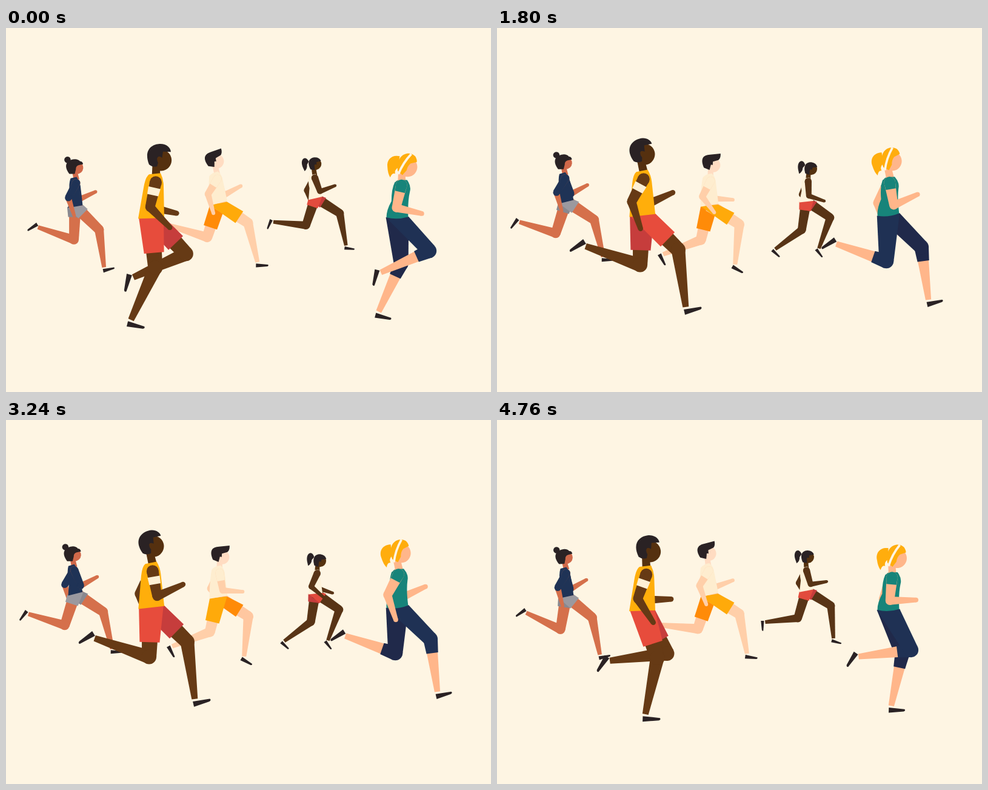
These frames come from a looping animation (800 by 600 pixels, 4800 ms). An HTML page:

```html
<!DOCTYPE html>
<html lang="en">
<head>
<meta charset="utf-8">
<title>Runners</title>
<style>
html, body { margin: 0; width: 100%; height: 100%; overflow: hidden; background: #fef5e3; }
svg { display: block; width: 100vw; height: 100vh; }
</style>
</head>
<body>
<svg id="stage" viewBox="0 0 800 600"></svg>
<script>
const STEP = 40, CYCLE = 24;
const INK = '#2a2224', CREAM = '#fef5e3';
const THIGH = 84, SHIN = 97, UPPER = 42, FORE = 47;

const mod = (n, m) => (n % m + m) % m;
const rad = a => a * Math.PI / 180;
const wave = (k, peak, period) => Math.cos(2 * Math.PI * (k - peak) / period);

// Smooth periodic curve through a few [step, value] keys.
function curve(...keys) {
  const n = keys.length;
  const key = i => [keys[mod(i, n)][0] + Math.floor(i / n) * CYCLE, keys[mod(i, n)][1]];
  const slope = i => {
    const [t0, v0] = key(i - 1), [t1, v1] = key(i + 1);
    return (v1 - v0) / (t1 - t0);
  };
  return k => {
    let i = 0;
    while (key(i + 1)[0] <= k) i++;
    const [t0, v0] = key(i), [t1, v1] = key(i + 1);
    const h = t1 - t0, u = (k - t0) / h, w = 1 - u;
    return v0 * w * w * (1 + 2 * u) + v1 * u * u * (3 - 2 * u) +
      h * u * w * (slope(i) * w - slope(i + 1) * u);
  };
}

// Limb angles through one stride, in degrees from straight down, forward positive.
const gait = {
  thigh: curve([0, 5], [5, -18.5], [9, -2], [12, 43.5], [15.5, 58], [21, 45.5]),
  shin: curve([0, -25], [4, -83], [7, -115], [9, -109], [12, -66], [14, -20], [17, 11], [21, 7.5]),
  foot: curve([0, 8], [3, 57], [5, 108], [9, 142], [12, 99], [15, 25], [18, -5], [21, -19]),
  upper: k => -9 + 27 * wave(k, 6, CYCLE) + 4 * wave(k, 6, CYCLE / 2),
  fore: k => 64 + 54 * wave(k, 7.2, CYCLE) + 4 * wave(k, 7.2, CYCLE / 2)
};
// Body motion repeats with every footfall, twice per stride.
const body = {
  bob: k => -9 + 9 * wave(k, -0.8, CYCLE / 2),
  lean: k => 4.9 + 4.9 * wave(k, 6.1, CYCLE / 2),
  nod: k => 10 + 10 * wave(k, 7.5, CYCLE / 2)
};

const runners = [
  { x: 114, y: 297, s: 0.66, phase: 21, skin: '#d5704b', face: '#d0694a',
    shirt: '#1f3356', near: '#9b999f', far: '#89888f', hem: 0.33, sleeve: 1,
    torso: 'M-18 3L-10 -32Q-12 -55 -5 -70L10 -72Q19 -58 18 -40L19 0Z',
    head: [10, -23, 15.5],
    hair: 'M-13 -14C-22 -40 -8 -47 6 -46Q18 -45 22 -36Q28 -34 27 -27L16 -28Q8 -28 6 -20L0 -10Z',
    bun: [-7, -49, 8] },
  { x: 350, y: 301, s: 0.7, phase: 18, skin: '#ffcfa9', farSkin: '#ffc7a0', face: '#ffdcc2',
    shirt: '#feedcf', near: '#ffaa0a', far: '#ff8b08', hem: 0.71, sleeve: 0.45,
    torso: 'M-21 2Q-17 -40 -10 -66Q-2 -74 12 -74Q20 -66 20 -52L22 -2Z',
    head: [8, -27, 17],
    hair: 'M-14 -22C-22 -44 -14 -52 2 -52L27 -53Q27 -42 21 -38L8 -35L7 -27Q2 -30 2 -25L-1 -16Z' },
  { x: 510, y: 290, s: 0.57, phase: 5, skin: '#583416', face: '#55320f',
    shirt: '#fef2da', near: '#e24b3d', far: '#c63d3c', hem: 0.32, sleeve: 0,
    torso: 'M-20 3L-12 -30Q-14 -55 -6 -66L12 -68Q16 -50 18 -36L21 0Z',
    head: [9, -27, 17.5],
    hair: 'M-8 -14C-16 -42 0 -47 10 -46Q24 -44 27 -32L13 -31L12 -24Q6 -28 5 -22L4 -10Z',
    tail: 'M-8 -38C-13 -56 -27 -52 -29 -36C-30 -26 -26 -18 -26 -13Q-16 -18 -15 -30Z' },
  { x: 239, y: 312, s: 1, phase: 0, skin: '#663a15', face: '#55300f',
    shirt: '#ffae0b', near: '#e74c3c', far: '#c63d3c', hem: 0.71, sleeve: 0, band: true,
    torso: 'M-21 3L-12 -48Q-9 -66 -3 -70L16 -72Q21 -62 21 -50L22 2Z',
    head: [10, -26, 17.5],
    hair: 'M-10 -20C-18 -44 -4 -53 9 -53C20 -53 27 -46 27 -39L14 -40L12 -30Q6 -35 4 -30Q3 -26 5 -22L3 -16Q-5 -15 -10 -20Z' },
  { x: 645, y: 312, s: 0.92, phase: 12, skin: '#ffb68a', face: '#ffb68a',
    shirt: '#17847a', near: '#1f3154', far: '#20294a', pants: true, sleeve: 0.3,
    torso: 'M-19 1Q-19 -12 -10 -28Q-10 -50 -4 -62Q6 -67 18 -66Q26 -55 23 -45Q19 -28 20 0Q0 6 -19 1Z',
    head: [12, -22, 17.5],
    hair: 'M-6 -16C-8 -48 18 -52 27 -40Q30 -34 29 -30L18 -28Q12 -24 10 -16L2 -8Z',
    tail: 'M-1 -42C-14 -46 -25 -38 -24 -24Q-24 -12 -20 -5Q-16 -14 -11 -11Q-12 -18 -5 -22Z',
    hairColor: '#ffad0d', headband: true }
];

const reach = (p, len, a) => [p[0] + len * Math.sin(rad(a)), p[1] + len * Math.cos(rad(a))];
const mix = (p, q, f) => [p[0] + (q[0] - p[0]) * f, p[1] + (q[1] - p[1]) * f];
const side = (p, a, w) => [p[0] + w * Math.cos(rad(a)), p[1] - w * Math.sin(rad(a))];
const turn = ([x, y], a) => {
  const c = Math.cos(rad(a)), s = Math.sin(rad(a));
  return [x * c - y * s, x * s + y * c];
};
const pt = p => p.map(n => n.toFixed(2)).join(' ');
const shape = (d, fill) => `<path d="${d}" fill="${fill}"/>`;
const poly = (pts, fill) => shape('M' + pts.map(pt).join('L') + 'Z', fill);
const dot = (p, r, fill) => `<circle cx="${p[0].toFixed(2)}" cy="${p[1].toFixed(2)}" r="${r}" fill="${fill}"/>`;
const taper = (p, q, a, w1, w2, fill) =>
  poly([side(p, a, w1), side(p, a, -w1), side(q, a, -w2), side(q, a, w2)], fill);
const place = (p, a, inner) => `<g transform="translate(${pt(p)}) rotate(${a.toFixed(2)})">${inner}</g>`;

function leg(r, k, lean, cloth, skin) {
  const a = gait.thigh(k), b = gait.shin(k);
  const hip = [0, 0], knee = reach(hip, THIGH, a), ankle = reach(knee, SHIN, b);
  const waist = [turn([-20, 1], -lean), turn([21, 0], -lean)];
  const cover = (end, w) => poly([...waist, side(end, a, w), side(end, a, -w)], cloth);
  const shoe = place(ankle, gait.foot(k), shape('M-4 1L-5 10L22 10Q26 9 24 6Z', INK));
  let out = shoe + taper(knee, mix(knee, ankle, 0.98), b, 11.5, 5, skin);
  if (r.pants) {
    const cuff = mix(knee, ankle, 0.26);
    return out + taper(knee, cuff, b, 13, 10.5, cloth) + dot(knee, 13, cloth) + cover(knee, 13);
  }
  out += taper(hip, knee, a, 15, 12, skin) + dot(knee, 12, skin);
  return out + cover(mix(hip, knee, r.hem), 16.5);
}

function arm(r, k, lean, root) {
  const a = gait.upper(k), b = gait.fore(k);
  const top = turn(root, -lean), elbow = reach(top, UPPER, a), hand = reach(elbow, FORE, b);
  let out = taper(elbow, hand, b, 7.5, 4.2, r.skin) + dot(hand, 4.2, r.skin) +
    dot(elbow, 7.8, r.skin) + dot(top, 10, r.skin) + taper(top, elbow, a, 10, 7.8, r.skin);
  if (r.sleeve) {
    const end = mix(top, elbow, r.sleeve);
    out += dot(top, 10, r.shirt) + taper(top, end, a, 10, 9, r.shirt);
    if (r.sleeve === 1) out += dot(elbow, 8.5, r.shirt);
  }
  if (r.band) out += taper(mix(top, elbow, 0.22), mix(top, elbow, 0.52), a, 10.2, 9.4, '#fef0d5');
  return out;
}

function head(r) {
  const color = r.hairColor || INK, [x, y, size] = r.head;
  let out = r.tail ? shape(r.tail, color) : '';
  if (r.bun) out += dot(r.bun, r.bun[2], color);
  out += shape('M-4 -24L8 -20L7 6L-7 6Z', r.face) + dot([x, y], size, r.face) + shape(r.hair, color);
  if (r.headband) out += `<path d="M-5 -10Q4 -30 20 -45" fill="none" stroke="${CREAM}" stroke-width="4"/>`;
  return out;
}

function runner(r, k) {
  const near = mod(k + r.phase, CYCLE), far = mod(near + CYCLE / 2, CYCLE);
  const lean = body.lean(near), nod = body.nod(near);
  const y = r.y + body.bob(near) * r.s;
  const [nx, ny] = turn([8, -66], -lean);
  return `<g transform="translate(${r.x} ${y.toFixed(2)}) scale(${r.s})">` +
    arm(r, far, lean, [6, -57]) +
    leg(r, far, lean, r.far, r.farSkin || r.skin) + leg(r, near, lean, r.near, r.skin) +
    place([nx, ny - nod * 0.25], -nod, head(r)) +
    place([0, 0], -lean, shape(r.torso, r.shirt)) +
    arm(r, near, lean, [8, -57]) + '</g>';
}

const stage = document.getElementById('stage');
let shown = -1, start;

function draw(now) {
  if (start === undefined) start = now;
  const k = Math.floor((now - start) / STEP) % CYCLE;
  if (k !== shown) {
    shown = k;
    stage.innerHTML = runners.map(r => runner(r, k)).join('');
  }
  requestAnimationFrame(draw);
}
requestAnimationFrame(draw);
</script>
</body>
</html>
```
